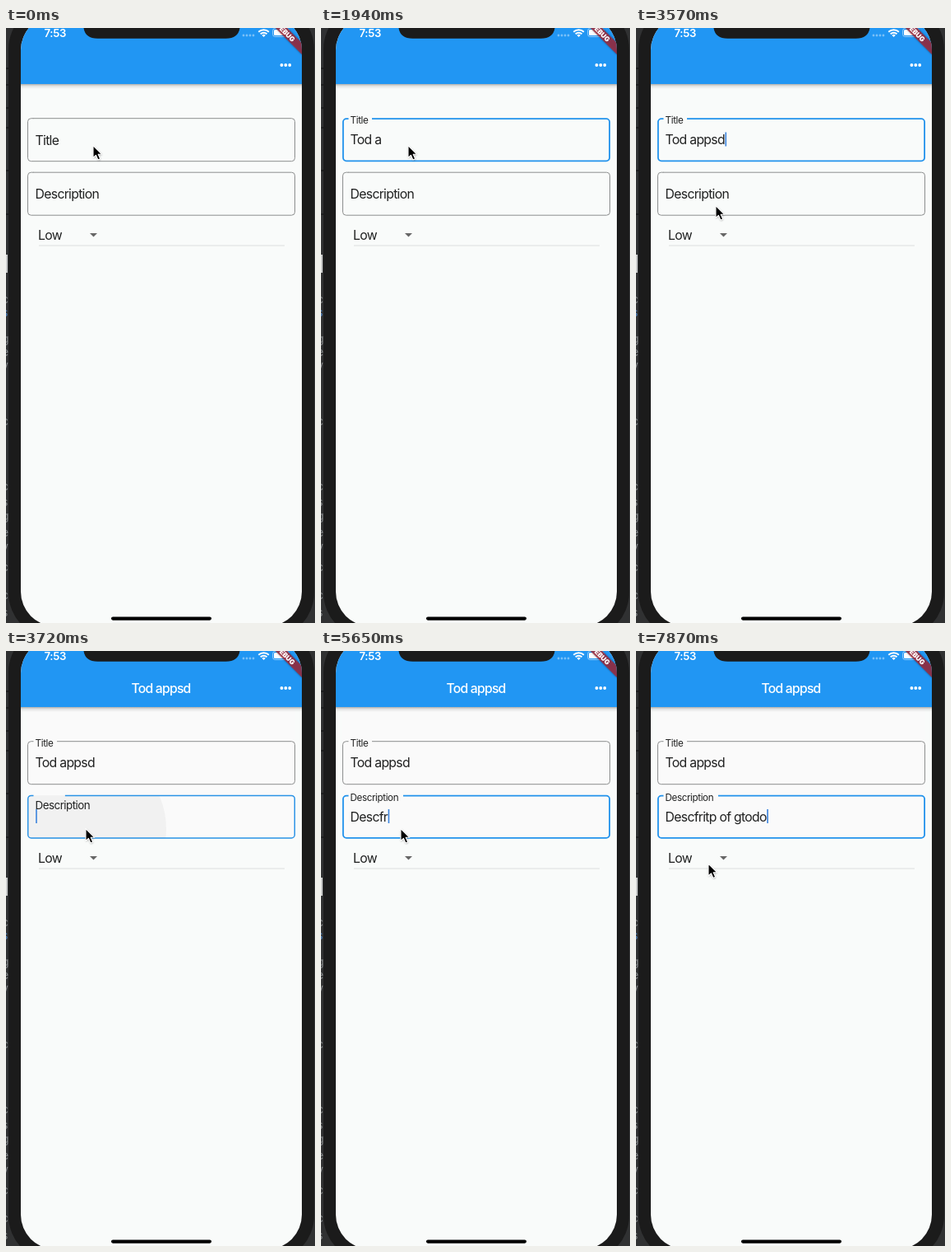
These frames come from a looping animation (376x722 px, 8000 ms). An HTML page:

```html
<!DOCTYPE html>
<html lang="en">
<head>
<meta charset="utf-8">
<title>Form entry</title>
<style>
html, body { margin: 0; width: 100%; height: 100%; overflow: hidden; background: #1b1b1b; }
svg { display: block; width: 376px; height: 722px; }
text { font-family: Inter, Roboto, sans-serif; white-space: pre; }
.body { font-size: 15.8px; letter-spacing: -.72px; fill: #202121; }
</style>
</head>
<body>
<svg viewBox="0 0 376 722">
  <defs>
    <clipPath id="screen"><rect x="18" y="-15" width="342" height="741" rx="42"/></clipPath>
    <linearGradient id="shade" x2="0" y2="1">
      <stop stop-color="#000" stop-opacity=".3"/>
      <stop offset=".4" stop-color="#000" stop-opacity=".1"/>
      <stop offset="1" stop-color="#000" stop-opacity="0"/>
    </linearGradient>
    <filter id="soft" x="-50%" y="-50%" width="200%" height="200%"><feGaussianBlur stdDeviation="1.3"/></filter>
  </defs>
  <rect width="376" height="722" fill="#303132"/>
  <g id="editor" font-size="13"></g>
  <rect x="3" y="-30" width="372" height="771" rx="56" fill="#1b1b1b"/>
  <g clip-path="url(#screen)">
    <rect x="18" y="-15" width="342" height="741" fill="#f9fbfa"/>
    <rect id="tint" x="26" y="68" width="326" height="160" fill="#fafafa"/>
    <rect x="18" y="68" width="342" height="6" fill="url(#shade)"/>
    <rect x="18" y="-15" width="342" height="83" fill="#2196f3"/>
    <g fill="#fff">
      <text x="46.5" y="11" font-size="13.2" font-weight="600" letter-spacing="-.3">7:53</text>
      <g opacity=".4"><circle cx="289" cy="9" r="1.4"/><circle cx="293" cy="9" r="1.4"/><circle cx="297" cy="9" r="1.4"/><circle cx="301" cy="9" r="1.4"/></g>
      <g fill="none" stroke="#fff" stroke-width="1.9">
        <path d="M307.3 4.8a9 9 0 0 1 12.6 0M309.7 7.3a5.6 5.6 0 0 1 7.8 0"/>
      </g>
      <path d="M313.6 11l-2.2-2.3a3.2 3.2 0 0 1 4.4 0z"/>
      <rect x="324.5" y=".5" width="20" height="10" rx="3" fill="none" stroke="#fff" stroke-opacity=".5"/>
      <rect x="326" y="2" width="17" height="7" rx="1.6"/>
      <circle cx="335.4" cy="45" r="1.9"/><circle cx="340.3" cy="45" r="1.9"/><circle cx="345.2" cy="45" r="1.9"/>
      <text id="heading" x="188.5" y="51" text-anchor="middle" font-size="15.8" font-weight="500" letter-spacing="-.8"></text>
    </g>
    <g transform="translate(340.2 5.2) rotate(45)">
      <rect x="-33" y="-5" width="66" height="10" opacity=".45" filter="url(#soft)"/>
      <rect x="-33" y="-5" width="66" height="10" fill="#a52a3c" opacity=".8"/>
      <text y="3" text-anchor="middle" font-size="8.2" font-weight="900" fill="#fff">DEBUG</text>
    </g>
    <g id="fields"></g>
    <text class="body" x="39" y="256.5">Low</text>
    <path d="M102 249h9l-4.5 4.5z" fill="#666"/>
    <path d="M40 264h299" stroke="#dcdede"/>
    <rect x="128" y="714.5" width="122" height="4.2" rx="2.1"/>
  </g>
  <path d="M90-2q4 0 4.500 2q2 12.800 17 12.800h156q15 0 17-12.800q.5-2 4.500-2z" fill="#1b1b1b"/>
  <rect id="caret" width="1.6" height="17" fill="#3b83dd"/>
  <g id="mouse">
    <path d="M0 0v15l3.400-3.200 2.500 5.700 2.800-1.200-2.500-5.500h4.600z" transform="translate(.3 1)" opacity=".4" filter="url(#soft)"/>
    <path d="M0 0v15l3.400-3.200 2.500 5.700 2.800-1.200-2.500-5.500h4.600z" stroke="#fff" stroke-width="1.1" stroke-linejoin="round"/>
  </g>
</svg>
<script>
const LOOP = 8000;
const $ = id => document.getElementById(id);

function add(parent, tag, attrs) {
  const el = document.createElementNS('http://www.w3.org/2000/svg', tag);
  set(el, attrs);
  parent.appendChild(el);
  return el;
}
function set(el, attrs) {
  for (const k in attrs) el.setAttribute(k, attrs[k]);
}

// Each track is a list of [start ms, value]; values hold until the next entry.
const tracks = {
  title: [[0, ''], [1490, 'Tod'], [1940, 'Tod a'], [2540, 'Tod ap'], [2690, 'Tod app'],
    [2840, 'Tod apps'], [2990, 'Tod appsd']],
  desc: [[0, ''], [4310, 'D'], [4610, 'De'], [4760, 'Des'], [5350, 'Desc'], [5650, 'Descfr'],
    [5800, 'Descfri'], [5950, 'Descfritp'], [6090, 'Descfritp o'], [6240, 'Descfritp of'],
    [6540, 'Descfritp of '], [6830, 'Descfritp of gt'], [6980, 'Descfritp of gto'],
    [7130, 'Descfritp of gtodo']],
  caret: [[0, 0], [140, 1], [590, 0], [1190, 1], [1490, 0], [2540, 1], [4160, 0], [4760, 1],
    [5050, 0], [5650, 1], [6240, 0], [6540, 1], [7130, 0], [7580, 1]],
  mouse: [[0, [106, 142.5]], [2840, [105.5, 147]], [2990, [105, 152.5]], [3130, [103, 166]],
    [3280, [100, 192]], [3430, [97.5, 211]], [3570, [97, 215.5]], [7580, [94, 229]],
    [7720, [89, 249]], [7870, [88, 258]]]
};
const at = (name, t) => tracks[name].findLast(k => k[0] <= t)[1];

const mix = (a, b, p) => a + (b - a) * p;
const color = p => `rgb(${[[140, 33], [142, 146], [142, 236]].map(c => Math.round(mix(c[0], c[1], p)))})`;

function makeField(name, label, top, gapEnd, start) {
  const g = $('fields');
  const clip = add(add(g, 'clipPath', { id: name + 'Clip' }), 'rect',
    { x: 27, y: top, width: 324, height: 52, rx: 4 });
  const ripple = add(add(g, 'g', { 'clip-path': `url(#${name}Clip)` }), 'circle', { r: 98, fill: '#f1f1f1' });
  const border = add(g, 'path', { fill: 'none' });
  const caption = add(g, 'text', { x: 35.6, fill: '#202121' });
  const input = add(g, 'text', { class: 'body', x: 35.6, y: top + 31.3 });
  caption.textContent = label;
  return { name, top, gapEnd, start, ripple, border, caption, input };
}

const fields = [
  makeField('title', 'Title', 109.7, 62, 140),
  makeField('desc', 'Description', 175.2, 100, 3720)
];

function drawField(f, t, focused, mouse) {
  const opening = t >= f.start && t < f.start + 150;
  const p = t < f.start ? 0 : opening ? .58 : 1;
  const w = focused ? mix(1, 1.8, p) : 1;
  const inset = (w - 1) / 2;
  const l = 26.5 + inset, r = 351.5 - inset, y = f.top + inset, b = f.top + 52 - inset;
  const arc = (x, y) => `a4 4 0 0 1 ${x} ${y}`;
  set(f.border, {
    d: `M${mix(33, f.gapEnd, p)} ${y}H${r - 4}${arc(4, 4)}V${b - 4}${arc(-4, 4)}H${l + 4}${arc(-4, -4)}V${y + 4}${arc(4, -4)}H33.500`,
    stroke: color(focused ? Math.min(1, p * 1.6) : 0), 'stroke-width': w
  });
  set(f.caption, {
    y: f.top + mix(31.8, 6.5, opening ? .59 : p),
    'font-size': mix(15.8, 11.7, p),
    'letter-spacing': mix(-.72, -.42, p)
  });
  set(f.ripple, { cx: mouse[0], cy: mouse[1], opacity: opening ? 1 : 0 });
  const value = at(f.name, t);
  if (f.input.textContent !== value) f.input.textContent = value;
}

function drawEditor() {
  const g = $('editor');
  for (const y of [48, 68, 96, 120, 172, 225]) add(g, 'rect', { y, width: 3, height: 2, fill: '#1d1e1f' });
  add(g, 'rect', { y: 275, width: 2, height: 22, fill: '#c9caca' });
  [313, 330, 346, 378, 394, 410, 478, 540, 557, 576, 593, 613, 630, 655, 671, 689, 710].forEach((y, i) => {
    add(g, 'text', { x: -4.5, y: y + 4, fill: y === 346 ? '#4a83c4' : '#85888a' }).textContent = 'tcsgevc'[i % 7];
  });
}

function render(t) {
  const mouse = at('mouse', t);
  const active = t >= 3720 ? 1 : 0;
  fields.forEach((f, i) => drawField(f, t, i === active, mouse));
  const f = fields[active];
  const len = f.input.textContent ? f.input.getComputedTextLength() : 0;
  set($('caret'), { x: 36.2 + len, y: f.top + 16.8, opacity: at('caret', t) });
  set($('mouse'), { transform: `translate(${mouse})` });
  set($('tint'), { opacity: active });
  $('heading').textContent = active ? at('title', t) : '';
}

drawEditor();
const begin = performance.now();
function tick() {
  render((performance.now() - begin) % LOOP);
  requestAnimationFrame(tick);
}
render(0);
requestAnimationFrame(tick);
</script>
</body>
</html>
```
